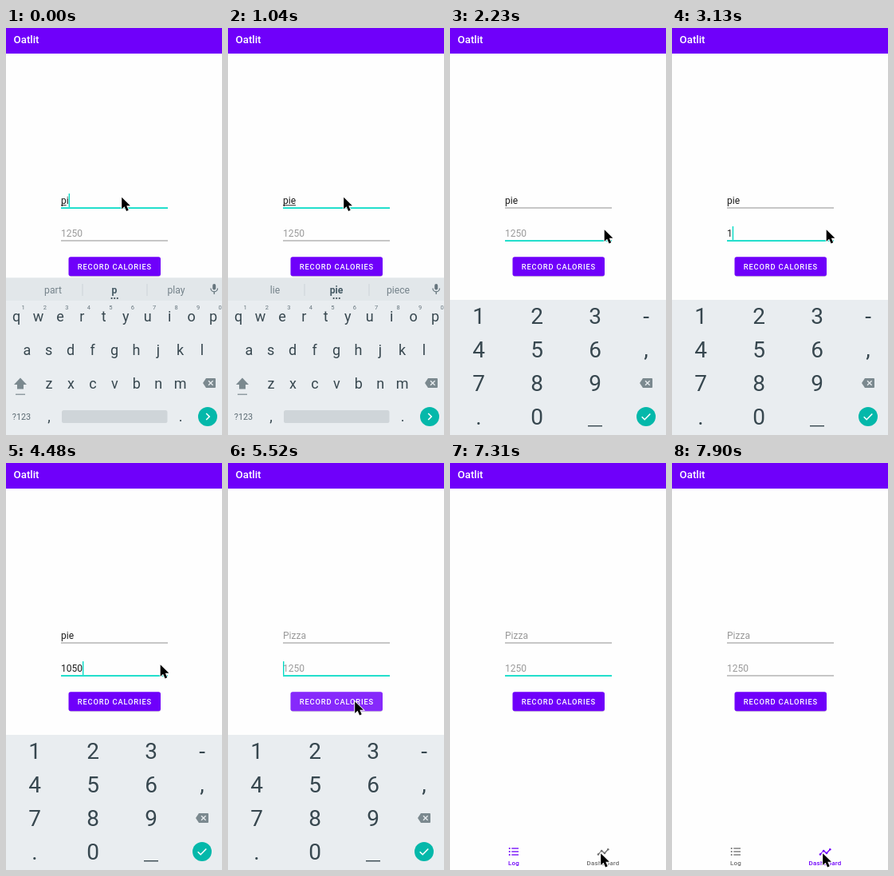
Write an HTML page with a canvas that moves like this. It is 271 px wide and 509 px high and loops after 8000 ms.

```html
<!DOCTYPE html>
<html lang="en">
<head>
<meta charset="utf-8">
<title>Calorie log</title>
<style>
html, body { margin: 0; height: 100%; overflow: hidden; background: #fefefe; }
canvas { display: block; }
</style>
</head>
<body>
<canvas id="stage" width="271" height="509"></canvas>
<script>
const ctx = document.getElementById('stage').getContext('2d');
const LOOP = 8000, TICK = 148.9;
const PURPLE = '#6f00fa', TEAL = '#03dac5', KEY = '#37474f', KEY_BG = '#e9edf0', GREY = '#6f6f6f';

function rect(x, y, w, h, color, r = 0) {
  ctx.fillStyle = color;
  ctx.beginPath();
  ctx.roundRect(x, y, w, h, r);
  ctx.fill();
}

function disc(x, y, r, color) {
  ctx.fillStyle = color;
  ctx.beginPath();
  ctx.arc(x, y, r, 0, Math.PI * 2);
  ctx.fill();
}

function line(points, color, width) {
  ctx.strokeStyle = color;
  ctx.lineWidth = width;
  ctx.beginPath();
  points.forEach(([x, y]) => ctx.lineTo(x, y));
  ctx.stroke();
}

function shape(path, x, y, color, scale = 1) {
  ctx.save();
  ctx.translate(x, y);
  ctx.scale(scale, scale);
  ctx.fillStyle = color;
  ctx.fill(new Path2D(path), 'evenodd');
  ctx.restore();
}

function text(str, x, y, size, color, { weight = 400, align = 'center', spacing = 0 } = {}) {
  ctx.font = `${weight} ${size}px Roboto, sans-serif`;
  ctx.letterSpacing = spacing + 'px';
  ctx.textAlign = align;
  ctx.fillStyle = color;
  ctx.fillText(str, x, y);
}

// Last [tick, value] entry that has started
const at = (steps, k) => steps.findLast(([start]) => start <= k)[1];

const foodSteps = [[0, 'pi'], [4, 'pie'], [37, '']];
const composeSteps = [[0, 'p'], [1, 'pi'], [5, 'pie'], [11, '']];
const calorieSteps = [[0, ''], [21, '1'], [24, '10'], [27, '105'], [30, '1050'], [37, '']];
const caretSteps = [[0, 1], [7, 0], [11, 1], [14, 0], [18, 1], [33, 0], [37, 1], [41, 0], [44, 1], [47, 0]];
const focusSteps = [[0, 0], [11, 1], [50, -1]];
const wordSteps = [
  [0, ['part', 'p', 'play']],
  [1, ['pie', 'pi', 'pic']],
  [5, ['lie', 'pie', 'piece']],
];
const pointerPath = [
  [0, 144.5, 211], [7, 144.5, 211], [10, 138.5, 257.5], [11, 138.5, 257.5], [14, 188.5, 256],
  [15, 193, 251.5], [31, 193, 251.5], [35, 158.5, 297.5], [40, 158.5, 297.5],
  [44, 183, 478], [47, 188.5, 487.5], [54, 188.5, 487.5],
];

function pointerAt(k) {
  const i = pointerPath.findLastIndex(([start]) => start <= k);
  const [t0, x0, y0] = pointerPath[i];
  const [t1, x1, y1] = pointerPath[i + 1] || pointerPath[i];
  const p = t1 > t0 ? (k - t0) / (t1 - t0) : 0;
  const e = p * p * (3 - 2 * p);
  return [x0 + (x1 - x0) * e, y0 + (y1 - y0) * e];
}

function field(value, hint, y, focused, caret) {
  text(value || hint, 69, y - 5, 12, value ? '#1c1c1c' : '#9a9a9a', { align: 'left' });
  if (focused) rect(69, y - 0.7, 134, 1.7, TEAL);
  else rect(69, y - 0.5, 134, 1, '#8f8f8f');
  if (focused && caret) rect(69 + (value && ctx.measureText(value).width), y - 18, 1.4, 17, TEAL);
}

function navigation(k) {
  const logColor = k < 50 ? PURPLE : GREY;
  const dashColor = k < 50 ? GREY : PURPLE;
  const label = { weight: 500, spacing: 0.27 };
  if (k >= 50 && k < 53) disc(192, 489, 20 * (k - 49), `rgba(111,0,250,${0.16 - 0.04 * (k - 50)})`);
  for (const y of [482, 486, 490]) {
    disc(74.7, y, 1, logColor);
    rect(77.3, y - 0.65, 8.7, 1.3, logColor);
  }
  text('Log', 80, 503, 8, logColor, label);
  const points = [[186, 489.5], [190.2, 485], [194, 488], [198.3, 483.3]];
  line(points, dashColor, 1.3);
  points.forEach(([x, y]) => disc(x, y, 1.3, dashColor));
  text('Dashboard', 192, 503, 8, dashColor, label);
}

function backspace(x, color) {
  shape('M-8 0L-4-6H7Q8-6 8-5V5Q8 6 7 6H-4Z', x, 444, color);
  line([[x - 1, 441.2], [x + 4.6, 446.8]], KEY_BG, 1.3);
  line([[x + 4.6, 441.2], [x - 1, 446.8]], KEY_BG, 1.3);
}

function actionKey(x, mark) {
  disc(x, 486, 12, '#04b8aa');
  line(mark.map(([dx, dy]) => [x + dx, 486 + dy]), '#fff', 1.6);
}

function microphone() {
  rect(259.2, 320, 4, 7.5, '#66757d', 2);
  ctx.strokeStyle = '#66757d';
  ctx.lineWidth = 1.2;
  ctx.beginPath();
  ctx.arc(261.2, 325.5, 4.3, 0, Math.PI);
  ctx.stroke();
  line([[261.2, 329.8], [261.2, 333]], '#66757d', 1.3);
}

function letterKeyboard(words) {
  rect(0, 312.5, 271, 197, KEY_BG);
  rect(0, 312.5, 271, 28.5, '#e2e7ea');
  words.forEach((word, i) => text(word, [59, 136, 213.5][i], 332, 12.2,
    i === 1 ? '#455a64' : '#74828a', { weight: i === 1 ? 700 : 400 }));
  for (const x of [95.5, 176.5]) rect(x, 320, 1, 15, '#ccd3d7');
  for (const x of [132.6, 136.2, 139.8]) disc(x, 338, 1.1, KEY);
  microphone();

  const rows = [['qwertyuiop', 13, 367], ['asdfghjkl', 26.3, 409], ['zxcvbnm', 54, 451]];
  for (const [keys, x, y] of rows) {
    [...keys].forEach((key, i) => text(key, x + 27.45 * i, y, 18, KEY));
  }
  [...'1234567890'].forEach((digit, i) => text(digit, 21.5 + 27.45 * i, 351.5, 7.5, '#66757d'));

  shape('M0-7.5L8 1H4V6.5H-4V1H-8Z', 18, 445, '#7b898f');
  rect(12, 457.6, 12, 1.2, '#7b898f');
  backspace(255, '#7b898f');
  text('?123', 19.5, 490, 10.8, '#5b6a72');
  text(',', 54, 492, 18, KEY);
  rect(70, 478, 132.5, 16, '#cfd5d9', 2.5);
  text('.', 219, 492, 18, KEY);
  actionKey(253, [[-1.8, -4], [2.2, 0], [-1.8, 4]]);
}

function numberKeyboard() {
  rect(0, 340, 271, 169, KEY_BG);
  ['123', '456', '789', '.0'].forEach((row, r) => {
    [...row].forEach((key, c) => text(key, 36 + 73 * c, 370 + 42 * r, 28, KEY));
  });
  rect(173, 497, 18, 1.4, KEY);
  text('-', 246, 370, 28, KEY);
  text(',', 246, 411, 28, KEY);
  backspace(246, '#7b898f');
  actionKey(246, [[-5.3, 0.2], [-1.8, 3.7], [5.3, -3.5]]);
}

function keyboard(k) {
  if (k < 12) return letterKeyboard(at(wordSteps, k));
  if (k >= 41) return;
  const hide = Math.max(0, k - 38) / 2;
  ctx.save();
  ctx.globalAlpha = 1 - hide / 2;
  ctx.translate(0, 49 * hide * hide);
  numberKeyboard();
  ctx.restore();
}

function pointer(k) {
  const [x, y] = pointerAt(k);
  const arrow = new Path2D('M0.7 0.8V15.4L4.1 12.3L6.6 18L9.2 16.8L6.8 11.3H11.4Z');
  ctx.save();
  ctx.translate(x, y);
  ctx.lineWidth = 1.8;
  ctx.strokeStyle = '#fff';
  ctx.stroke(arrow);
  ctx.fillStyle = '#000';
  ctx.fill(arrow);
  ctx.restore();
}

function draw(k) {
  rect(0, 0, 271, 509, '#fefefe');
  rect(0, 0, 271, 32, PURPLE);
  text('Oatlit', 9.5, 18.7, 13.3, '#fff', { weight: 500, align: 'left' });

  const focus = at(focusSteps, k), caret = at(caretSteps, k), composing = at(composeSteps, k);
  field(at(foodSteps, k), 'Pizza', 225, focus === 0, caret);
  if (composing) rect(69, 221.3, ctx.measureText(composing).width, 0.9, '#1c1c1c');
  field(at(calorieSteps, k), '1250', 266, focus === 1, caret);

  rect(79, 287, 115, 24.2, 'rgba(0,0,0,.16)', 3);
  rect(78.5, 286.3, 115.5, 24, PURPLE, 2.7);
  if (k >= 37 && k < 39) rect(78.5, 286.3, 115.5, 24, 'rgba(255,255,255,.16)', 2.7);
  text('RECORD CALORIES', 89.8, 301.8, 9.33, '#fff', { weight: 500, align: 'left', spacing: 0.83 });

  navigation(k);
  keyboard(k);
  pointer(k);
}

function frame() {
  const time = performance.now() % LOOP;
  draw(Math.floor((time + 8) / TICK));
  requestAnimationFrame(frame);
}
frame();
</script>
</body>
</html>
```
